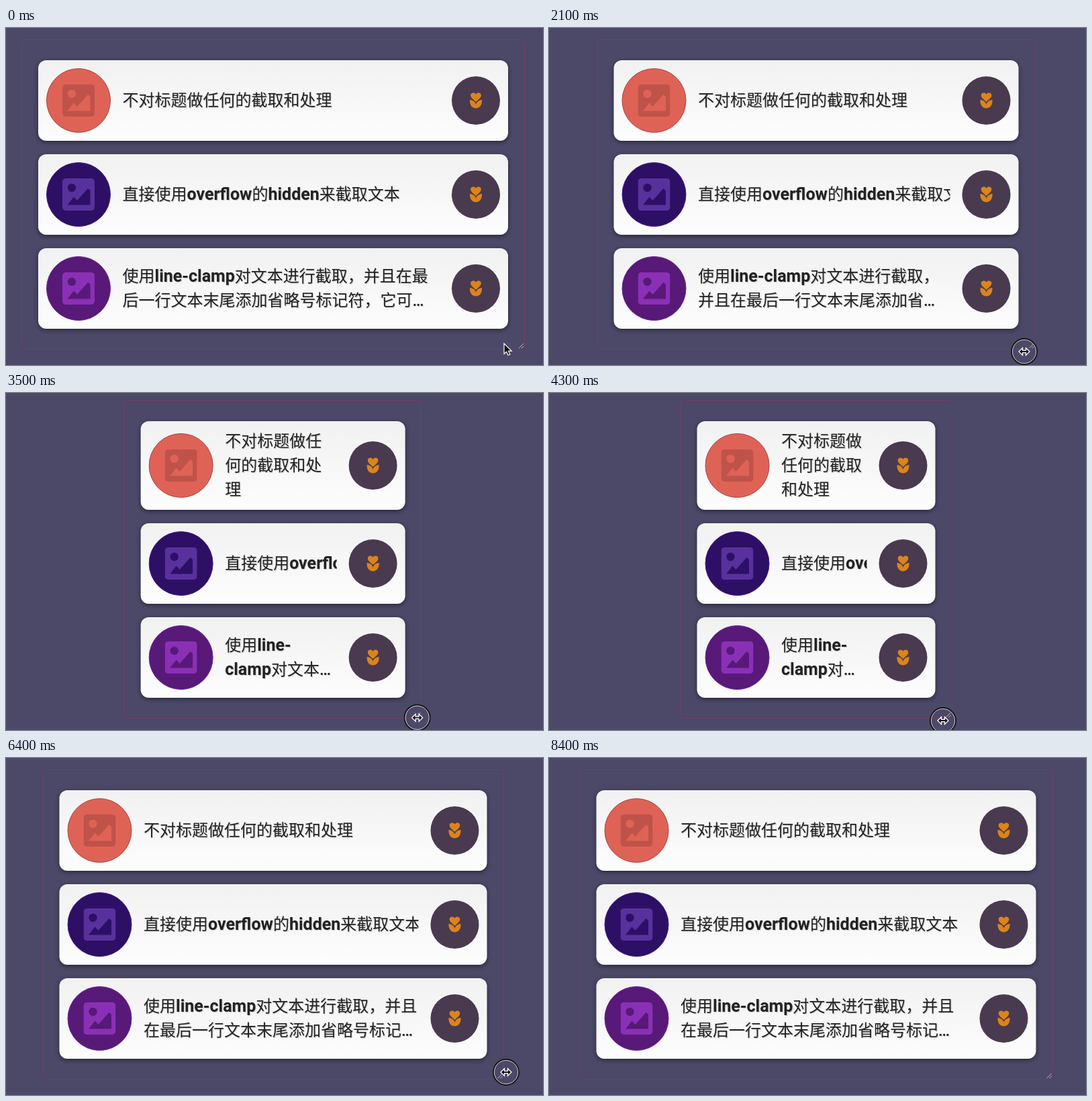
Animation of 800x502 px, one loop 8500 ms. Source, as an HTML page:

```html
<!DOCTYPE html>
<html lang="zh-CN">
<head>
<meta charset="utf-8">
<title>文本截取</title>
<style>
html, body { margin: 0; width: 100%; height: 100%; overflow: hidden; background: #4b4868; }
.stage { position: absolute; left: 0; top: 0; width: 795px; height: 495px; }
.box {
  position: absolute; left: 50%; top: 50%; transform: translate(-50%, -50%);
  box-sizing: border-box; padding: 30px 24px; border: 1px solid #783d62; border-radius: 4px;
  display: grid; gap: 20px;
}
.grip { position: absolute; right: 0; bottom: 0; }
.card {
  display: flex; align-items: center; padding: 12px; border-radius: 12px; min-width: 0;
  background: linear-gradient(#f1f1f1, #fdfdfd); box-shadow: 0 2px 6px #0007;
}
.thumb, .button { flex: none; border-radius: 50%; display: grid; place-items: center; box-sizing: border-box; }
.thumb { width: 96px; height: 96px; border: 1px solid; }
.button { width: 72px; height: 72px; background: #493a50; }
.title {
  flex: 1; min-width: 0; margin: 0 18px; color: #222; text-shadow: 1px 1px 1px #0003;
  font: 500 24px/36px Roboto, "Noto Sans CJK SC", "Noto Sans CJK", sans-serif;
}
.title b { font-size: 25px; font-weight: 600; line-height: 1; }
.hidden { overflow: hidden; white-space: nowrap; }
.clamp { overflow: hidden; display: -webkit-box; -webkit-box-orient: vertical; -webkit-line-clamp: 2; }
.cursor { position: absolute; left: 0; top: 0; width: 1px; height: 1px; overflow: visible; }
</style>
</head>
<body>
<div class="stage">
  <div class="box" id="box"></div>
</div>
<svg class="cursor" id="cursor">
  <path id="arrow" d="M0 0V15.5L3.6 12.2L6 17.5L8.8 16.2L6.5 11.2H11.2Z" fill="#111" stroke="#fff" stroke-width="1.2"/>
  <g id="resize" fill="none">
    <circle r="19" stroke="#111" stroke-width="1.8"/>
    <circle r="17.6" stroke="#ccc" stroke-width="1"/>
    <path d="M-8 0L-2.5 -5.5V-1.6H2.5V-5.5L8 0L2.5 5.5V1.6H-2.5V5.5Z" fill="#111" stroke="#fff" stroke-width="1.3"/>
  </g>
</svg>
<script>
const LOOP = 8500, STEP = 100, CENTER_X = 397.5;

const cards = [
  { fill: '#df6256', edge: '#a8463f', icon: '#bf5349', mode: '', text: '不对标题做任何的截取和处理' },
  { fill: '#2d0f66', edge: '#43218a', icon: '#59319c', mode: 'hidden', text: '直接使用<b>overflow</b>的<b>hidden</b>来截取文本' },
  { fill: '#581978', edge: '#6d2699', icon: '#8a30b6', mode: 'clamp',
    text: '使用<b>line-clamp</b>对文本进行截取，并且在最后一行文本末尾添加省略号标记符，它可以让标题始终保持在两行以内' }
];

const picture = ({ icon, fill }) => `<svg width="48" height="48">
  <rect width="48" height="48" rx="5" fill="${icon}"/>
  <circle cx="14" cy="14" r="6.2" fill="${fill}"/>
  <path d="M7.5 39.5L17 27.5L22 33L38 15L41.5 18V39.5Z" fill="${fill}"/></svg>`;

const tulip = `<svg width="18" height="24" fill="#dd8419" style="overflow:visible">
  <path d="M9 14C4 9.5 1.2 7.5 1.2 4.2C1.2 .2 6.5 -.8 9 2.6C11.5 -.8 16.8 .2 16.8 4.2C16.8 7.5 14 9.5 9 14Z"/>
  <path d="M0 11C5 11.5 8 14 9 18C10 14 13 11.5 18 11C18.5 18 15 23.5 9 23.5C3 23.5 -.5 18 0 11Z"/></svg>`;

const cardHtml = card => `<div class="card">
  <div class="thumb" style="background:${card.fill};border-color:${card.edge}">${picture(card)}</div>
  <div class="title ${card.mode}">${card.text}</div>
  <div class="button">${tulip}</div></div>`;

box.innerHTML = cards.map(cardHtml).join('') +
  '<svg class="grip" width="10" height="10" stroke="#bbb"><path d="M2 9L9 2M6 9L9 6"/></svg>';

// time, left edge of the box, pointer x, pointer y
const keys = [
  [0, 22.5, 742, 470],
  [400, 22.5, 759, 476],
  [1000, 22.5, 759, 477],
  [1800, 22.5, 757, 479],
  [2100, 71, 708, 482],
  [2700, 138, 649, 482],
  [3000, 141, 636, 482],
  [3600, 182, 608, 484],
  [4300, 195, 587, 488],
  [4600, 201, 582, 489],
  [5300, 143, 649, 484],
  [5400, 140, 650, 484],
  [5500, 140, 650, 484],
  [6400, 54, 745, 468],
  [6800, 45, 746, 469],
  [LOOP, 45, 746, 469]
];

function poseAt(time) {
  const next = keys.findIndex(key => key[0] > time);
  const from = keys[next - 1], to = keys[next];
  const part = (time - from[0]) / (to[0] - from[0]);
  return from.map((value, i) => value + (to[i] - value) * part);
}

function draw(now) {
  const time = Math.floor(now % LOOP / STEP) * STEP;
  const [, left, x, y] = poseAt(time);
  box.style.width = 2 * (CENTER_X - left) + 'px';
  cursor.style.transform = `translate(${x}px, ${y}px)`;
  cursor.style.display = time < 7500 ? '' : 'none';
  arrow.style.display = time < 400 ? '' : 'none';
  resize.style.display = time < 400 ? 'none' : '';
}

const start = performance.now();
function tick() {
  draw(performance.now() - start);
  requestAnimationFrame(tick);
}
tick();
</script>
</body>
</html>
```
